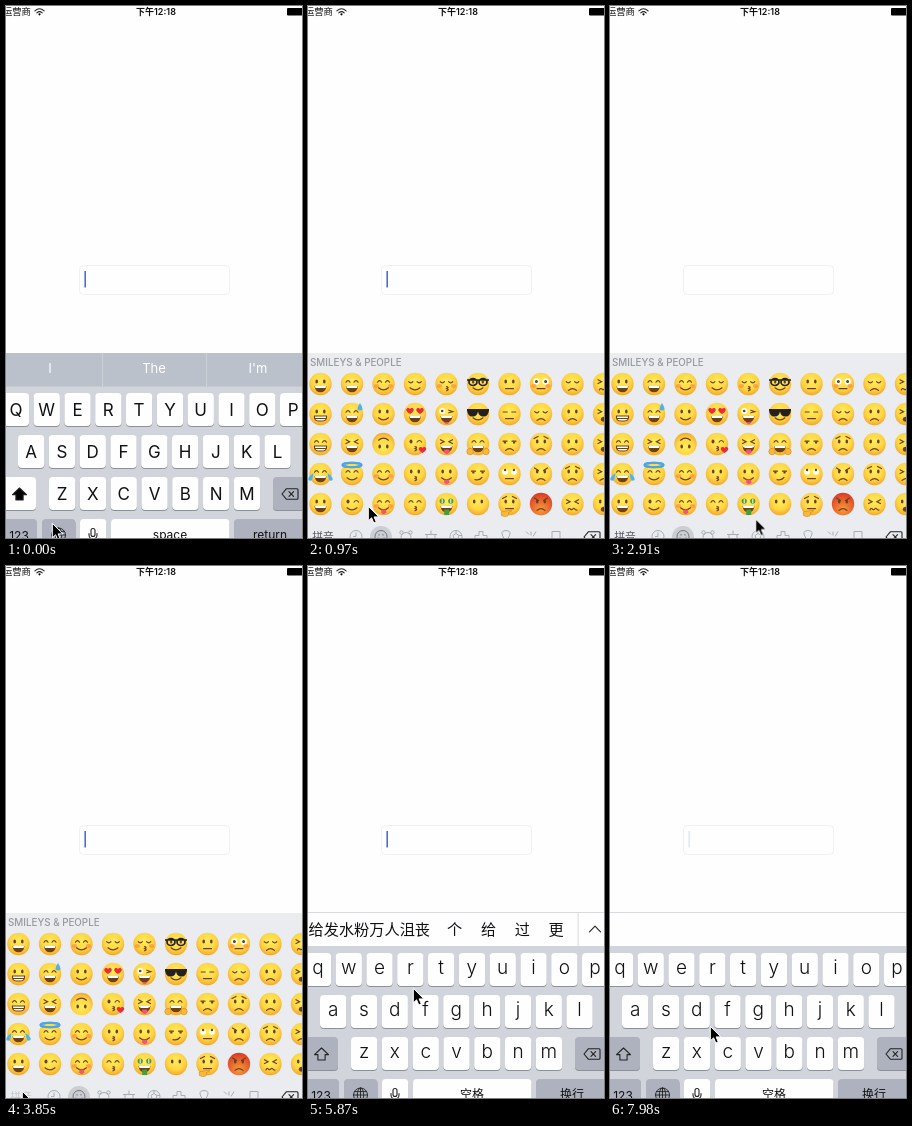
Recreate the animation shown at these times as an HTML page. Size 296 by 532 pixels, loop 8 s.

```html
<!DOCTYPE html>
<html lang="zh">
<head>
<meta charset="utf-8">
<title>Keyboard switching</title>
<style>
html, body { margin: 0; width: 100%; height: 100%; overflow: hidden; background: #fefefe; }
svg { display: block; width: 296px; height: 532px; }
text { font-family: Inter, "Noto Sans CJK SC", "Noto Sans CJK", sans-serif; text-anchor: middle; fill: #111; }
.start { text-anchor: start; }
.line { fill: none; stroke: #222; stroke-width: 1.1; stroke-linejoin: round; stroke-linecap: round; }
.tab { fill: none; stroke: #a9acb1; stroke-width: 1; }
.f { fill: #6b4218; }
.l { fill: none; stroke: #6b4218; stroke-width: 1.2; stroke-linecap: round; }
.w { fill: #fff; }
.r { fill: #ea2b3a; }
.p { fill: #f2557c; }
.c { fill: #f4694a; opacity: .45; }
.b { fill: #4fb2ea; }
.k { fill: #23201f; }
.o { fill: none; stroke: #23201f; stroke-width: 1.7; }
.g { fill: #4d9a3c; }
.y { fill: #fbb836; stroke: #cf861c; stroke-width: .6; }
.h { fill: none; stroke: #4aa5ea; stroke-width: 2; }
#caret { fill: #4870d2; animation: blink 8s linear infinite; }
#cursor { animation: move 8s ease-in-out infinite; }
@keyframes blink {
  0%, 3% { opacity: 1 }
  5%, 8.5% { opacity: 0 }
  11.5%, 14% { opacity: 1 }
  16%, 19% { opacity: 0 }
  21%, 23.4% { opacity: 1 }
  25.2%, 28% { opacity: 0 }
  30%, 33.5% { opacity: 1 }
  35.5%, 39% { opacity: 0 }
  41%, 53% { opacity: 1 }
  55.5%, 58.5% { opacity: 0 }
  60.3%, 78.5% { opacity: 1 }
  81%, 84.5% { opacity: 0 }
  86.5%, 89% { opacity: 1 }
  91%, 94.2% { opacity: 0 }
  96%, 97.8% { opacity: 1 }
  99.75%, 100% { opacity: .15 }
}
@keyframes move {
  0%, 3% { transform: translate(46px, 517px) }
  12.125% { transform: translate(60px, 500px) }
  15% { transform: translate(57px, 503px) }
  23.125% { transform: translate(132px, 512px); animation-timing-function: ease-out }
  25.5%, 27.75% { transform: translate(146px, 511px) }
  33% { transform: translate(166px, 511px) }
  37.75% { transform: translate(141px, 513px) }
  48.125%, 50.375% { transform: translate(16px, 525px) }
  58% { transform: translate(132px, 444px) }
  60.375% { transform: translate(129px, 441px) }
  66%, 77.875% { transform: translate(105px, 422px) }
  81.875%, 84.125% { transform: translate(12px, 360px) }
  91.75%, 94% { transform: translate(67px, 507px) }
  99.75%, 100% { transform: translate(100px, 460px) }
}
</style>
</head>
<body>
<svg id="stage" viewBox="0 0 296 532">
  <defs>
    <radialGradient id="yellow" cy=".38" r=".68">
      <stop offset="0" stop-color="#ffec5e"/>
      <stop offset=".55" stop-color="#ffd643"/>
      <stop offset="1" stop-color="#ee9d2b"/>
    </radialGradient>
    <radialGradient id="red" cy=".75" r=".75">
      <stop offset="0" stop-color="#f79a3a"/><stop offset="1" stop-color="#dc3a25"/>
    </radialGradient>
    <clipPath id="bar"><path d="M0 347h270v33H0z"/></clipPath>
  </defs>
  <rect width="296" height="532" fill="#fefefe"/>
  <text class="start" x="-3" y="9.3" font-size="9.3">运营商</text>
  <g transform="translate(33.5 9)">
    <path class="line" stroke-width="1.3" d="M-4.6-4.2q4.6-4 9.2 0M-2.7-2.2q2.7-2.3 5.4 0"/>
    <circle r="1.1" cy="-.7"/>
  </g>
  <text x="150" y="9.2" font-size="9" font-weight="600">下午12:18</text>
  <rect x="281" y="2" width="20" height="7.5" rx="1"/>
  <rect x="73.5" y="259.5" width="150" height="29" rx="4" fill="#fefefe" stroke="#f0f0f0"/>
  <rect id="caret" x="78.4" y="265" width="1.6" height="16.5"/>
  <g id="boards"></g>
  <g id="cursor">
    <path d="M.3.3v14.6l3.3-3.1 2.2 5.2 2.5-1-2.2-5.1h4.7z" fill="#000" stroke="#fff" stroke-width="1"/>
  </g>
</svg>
<script>
const LOOP = 8000;

function add(parent, tag, attrs, text) {
  const node = document.createElementNS('http://www.w3.org/2000/svg', tag);
  for (const name in attrs) node.setAttribute(name, attrs[name]);
  if (text) node.textContent = text;
  return parent.appendChild(node);
}
const group = (parent, x = 0, y = 0) => add(parent, 'g', { transform: `translate(${x} ${y})` });
const box = (parent, x, y, width, height, fill, rx = 0) =>
  add(parent, 'rect', { x, y, width, height, fill, rx });
const label = (parent, x, y, size, text, more) =>
  add(parent, 'text', { x, y, 'font-size': size, ...more }, text);
const icon = (parent, x, y, d, cls = 'line') => add(group(parent, x, y), 'path', { d, class: cls });

// Visible between two times, with optional fades after each
function show(node, from, to, fade = 0) {
  const keys = [];
  const key = (time, opacity) => keys.push({ offset: Math.min(time / LOOP, 1), opacity });
  if (from > 0) { key(0, 0); key(from, 0); }
  key(from, from && fade ? 0 : 1);
  if (from) key(from + fade, 1);
  key(to, 1);
  if (to < LOOP) { key(to + fade, 0); key(LOOP, 0); }
  node.animate(keys, { duration: LOOP, iterations: Infinity });
}

const DELETE = 'M-8 0l4.5-5.3H7q1 0 1 1v8.6q0 1-1 1H-3.5zM-1-2.3l4.6 4.6M3.6-2.3L-1 2.3';
const GLOBE = 'M-7 0a7 7 0 1 1 14 0a7 7 0 1 1-14 0M-3.2 0a3.2 7 0 1 1 6.4 0a3.2 7 0 1 1-6.4 0M-7 0H7M0-7V7M-6-3.4H6M-6 3.4H6';
const MIC = 'M-2-4a2 2 0 0 1 4 0v4a2 2 0 0 1-4 0zM-4-1v1.5a4 4 0 0 0 8 0V-1M0 4.6V7';
const SHIFT = 'M0-6l7 6.6H3.6V6h-7.2V.6H-7z';

function key(parent, x, y, w, dark) {
  box(parent, x, y + 1.1, w, 33, '#8c9098', 4);
  box(parent, x, y, w, 33, dark ? '#adb2be' : '#fefefe', 4);
}

function board(upper, space, enter) {
  const g = group(boards);
  box(g, 0, 380, 296, 152, '#d1d5db');
  const rows = [['qwertyuiop', -3.2, 387], ['asdfghjkl', 12, 429], ['zxcvbnm', 43, 471]];
  for (const [letters, left, y] of rows) {
    [...letters].forEach((ch, i) => {
      const x = left + i * 30.8;
      key(g, x, y, 26.3);
      label(g, x + 13.1, y + (upper ? 22.7 : 21), upper ? 17 : 19,
        upper ? ch.toUpperCase() : ch, { 'font-weight': upper ? 400 : 300 });
    });
  }
  key(g, -6, 471, 36, !upper);
  icon(g, 13.5, 488, SHIFT).style.fill = upper ? '#000' : 'none';
  key(g, 267, 471, 36, true);
  icon(g, 284, 488, DELETE);
  key(g, -6, 513, 37, true);
  label(g, 13, 533.5, 12, '123');
  key(g, 36, 513, 33.5, true);
  icon(g, 52.5, 529, GLOBE).style.strokeWidth = .9;
  key(g, 74, 513, 26.3);
  icon(g, 87, 528.5, MIC);
  key(g, 105, 513, 118.5);
  label(g, 164, 532.5, 12, space);
  key(g, 228, 513, 75, true);
  label(g, 264, 532.5, 12, enter);
  return g;
}

// Face parts: class and path pairs
const disc = (x, y, r, ry = r) => `M${x - r} ${y}a${r} ${ry} 0 1 0 ${2 * r} 0a${r} ${ry} 0 1 0 ${-2 * r} 0`;
const pair = (x, y, r, ry) => disc(-x, y, r, ry) + disc(x, y, r, ry);
const heart = (x, y) => `M${x} ${y + 3}q-6-4-2.6-6 1.8-.5 2.6 1 .8-1.5 2.6-1 3.4 2-2.6 6z`;
const SMILE = 'M-5 3.8q5 4.2 10 0';
const TEETH = 'M-6 2H6q.5 5-4 5h-4Q-6.5 7-6 2z';
const PARTS = {
  o: ['f', pair(3.8, -2.5, 1.3, 1.9)],
  '^': ['l', 'M-6-1.8q2-3.2 4 0M2-1.8q2-3.2 4 0'],
  u: ['l', 'M-6.3-2.4q2.2 2.4 4.2 0M2.1-2.4q2.2 2.4 4.2 0'],
  '-': ['l', 'M-6.3-2h4M2.3-2h4'],
  x: ['l', 'M-6-4.3l3.6 2-3.6 1.8M6-4.3l-3.6 2 3.6 1.8'],
  h: ['r', heart(-5, -3) + heart(5, -3)],
  i: ['f', disc(-4, -2.5, 1.5, 2), 'l', 'M2.1-2q2.2-3 4.4 0'],
  I: ['w', disc(-4.3, -3, 3), 'f', disc(-4.3, -3, 1.3), 'l', 'M2.3-3.8l4 1.4-4 1.2'],
  d: ['f', pair(4.6, -1.6, 1.2), 'l', 'M-6.5-2.8h4M2.5-2.8h4'],
  E: ['w', pair(4.4, -2.3, 3), 'f', pair(4.4, -4, 1.2)],
  B: ['w', pair(4.6, -2.5, 3.2), 'f', pair(4.6, -2.5, 1.5)],
  G: ['f', pair(4.8, -2, 1.2, 1.6), 'o', pair(5, -2, 4, 3.5) + 'M-11-4H11'],
  S: ['k', 'M-11-5h22v1.5q-1 6-5 6Q1 3 0-2.5-1 3-6 2.5q-4 0-5-6z'],
  $: ['g', pair(4.3, -3, 2.6), 'w', 'M-4.8-5h1v4h-1zM3.8-5h1v4h-1z'],
  D: ['f', 'M-6 2H6q-.8 6.3-6 6.3T-6 2z', 'w', 'M-5.6 2H5.6l-.6 2.1H-5z'],
  s: ['l', SMILE],
  f: ['l', 'M-4 6.4q4-3.4 8 0'],
  _: ['l', 'M-4 4.6h8'],
  m: ['l', 'M-3 5.6q5 1 7-2.2'],
  K: ['l', 'M0 2.6q3 .6.3 2 3 .8-.3 2.2'],
  t: ['l', SMILE, 'p', 'M-2.3 5.5h5v3q-2.5 3.6-5 0z'],
  n: ['g', 'M-2.3 5.5h5v5.5h-5z'],
  e: ['w', TEETH, 'l', TEETH + 'M-5 4.5H5'],
  W: ['l', 'M-4.5 6q1-2.4 2.4-1t2.4 0 2 0 2.2 1'],
  O: ['f', disc(0, 5.2, 3.2, 2.5)],
  C: ['c', pair(7, 2, 2.6, 1.9)],
  z: ['b', 'M8-11q5 7.5 0 7.5T8-11z'],
  j: ['b', 'M-7-1q-6 4-5 7Q-8 9-7-1zM7-1q6 4 5 7Q8 9 7-1z'],
  H: ['h', disc(0, -9, 9.5, 2.2)],
  v: ['r', heart(7.5, 6)],
  A: ['l', 'M-6.5-6l4 2.4M6.5-6l-4 2.4'],
  Q: ['l', 'M-7-5.5l4-2M7-5.5l-4-2'],
  N: ['y', disc(-8, 7.5, 3.2) + disc(8, 7.5, 3.2)],
  Y: ['y', 'M-8 11.5q-1-5 2-4l8-1.5q1 1.5-3 2.6 1 4-4 4z']
};
const FACES = [
  'oD oe ^e ^Dj oD', '^D ^Dz xD ^sHH is', '^sC os osU ^sC ^tC', 'us hD iKv oK ^K', 'uKC ItD xDt ot $Dn',
  'Gs Ss ^DN dm o', 'o_ -_ df E_ Qo_Y', 'B_C uf Qof Aof AofR', 'uf of of Qof xW', 'xW xO xO xf oO'
];

function face(parent, x, y, code) {
  const g = group(parent, x, y);
  const inner = add(g, 'g', { transform: code.includes('U') ? 'rotate(180)' : '' });
  add(inner, 'circle', { r: 11.2, fill: code.includes('R') ? 'url(#red)' : 'url(#yellow)' });
  for (const ch of code) {
    const part = PARTS[ch] || [];
    for (let i = 0; i < part.length; i += 2) add(inner, 'path', { class: part[i], d: part[i + 1] });
  }
}

// English keyboard
const english = board(true, 'space', 'return');
box(english, 0, 347, 296, 33.5, '#bbc1ca');
["I", 'The', "I'm"].forEach((word, i) => {
  label(english, 44 + i * 104, 367, 13, word, { style: 'fill:#fff' });
  if (i) box(english, i * 104 - 8, 347, 1, 33, '#cdd2d9');
});
show(english, 0, 300);

// Emoji keyboard
const emoji = group(boards);
box(emoji, 0, 347, 296, 185, '#eaecf0');
label(emoji, 2, 360, 9.8, 'SMILEYS & PEOPLE', { class: 'start', style: 'fill:#96989d', 'font-weight': 500 });
FACES.forEach((column, c) => column.split(' ').forEach((code, r) =>
  face(emoji, 12.5 + c * 31.5, 378 + r * 30, code)));
const back = label(emoji, 15, 534.5, 10.8, '拼音', { style: 'fill:#55585e' });
add(emoji, 'circle', { cx: 73, cy: 531, r: 11, fill: '#cbced3' });
const tabs = [
  disc(0, 0, 6) + 'M0-4V0H-3',
  disc(0, 0, 6) + 'M-3 1q3 4 6 0M-2-2.5v1.5M2-2.5v1.5',
  disc(0, 1, 5) + disc(-4.5, -4, 1.7) + disc(4.5, -4, 1.7),
  'M-6-2H6M-4-2v6h8v-6M0-2v-4',
  disc(0, 0, 6) + 'M0-3l3 2-1 3h-4l-1-3zM0-6v3M6-1H3',
  'M-6-1h4v-4h4v4h4v5H-6z',
  'M-2 4v-2q-5-8 2-8t2 8v2zM-2 6h4',
  'M-5-5l3 3M5-5l-3 5M0-5v4M-4 3h2M2 4l3-2',
  'M-4-5h8v9M-4-5v9M-7 4h3M1 4h3'
];
tabs.forEach((d, i) => {
  const tab = icon(emoji, 48 + i * 25, 530.5, d, 'tab');
  if (i === 1) tab.style.stroke = '#72757b';
});
icon(emoji, 284, 531, DELETE);
back.animate([
  { opacity: 1, offset: 0 }, { opacity: 1, offset: .476 },
  { opacity: .25, offset: .481 }, { opacity: .25, offset: 1 }
], { duration: LOOP, iterations: Infinity });
show(emoji, 300, 4090);

// Pinyin keyboard
const pinyin = board(false, '空格', '换行');
box(pinyin, 0, 346, 296, 34, '#fefefe');
const hint = group(pinyin);
key(hint, 74, 513, 149.5);
label(hint, 148.5, 533, 12.2, '简体拼音');
show(hint, 0, 4880, 220);
show(box(pinyin, 0, 346, 296, 1, '#d9dadd'), 4860, LOOP);
show(pinyin, 4090, LOOP);

// Candidate bar
const more = group(pinyin);
box(more, 269.6, 347, 1, 33, '#d9dadd');
icon(more, 287, 363, 'M-5.5 2.8L0-2.8l5.5 5.6');
show(more, 5010, 6800);
const steps = [[5010, ''], [5210, '规范'], [5580, '股份是'], [5730, '给发水粉'], [5870, '给发水粉万人沮丧'], [6800]];
steps.slice(0, -1).forEach(([time, first], i) => {
  const row = add(pinyin, 'g', { 'clip-path': 'url(#bar)' });
  const words = [first, ...'个给过更国高该搞'].filter(Boolean);
  let x = .5;
  for (const word of words) {
    label(row, x, 369, 15.2, word, { class: 'start' });
    x += word.length * 15.2 + (word === first ? 17 : 18.6);
  }
  show(row, time, steps[i + 1][0]);
});
</script>
</body>
</html>
```
